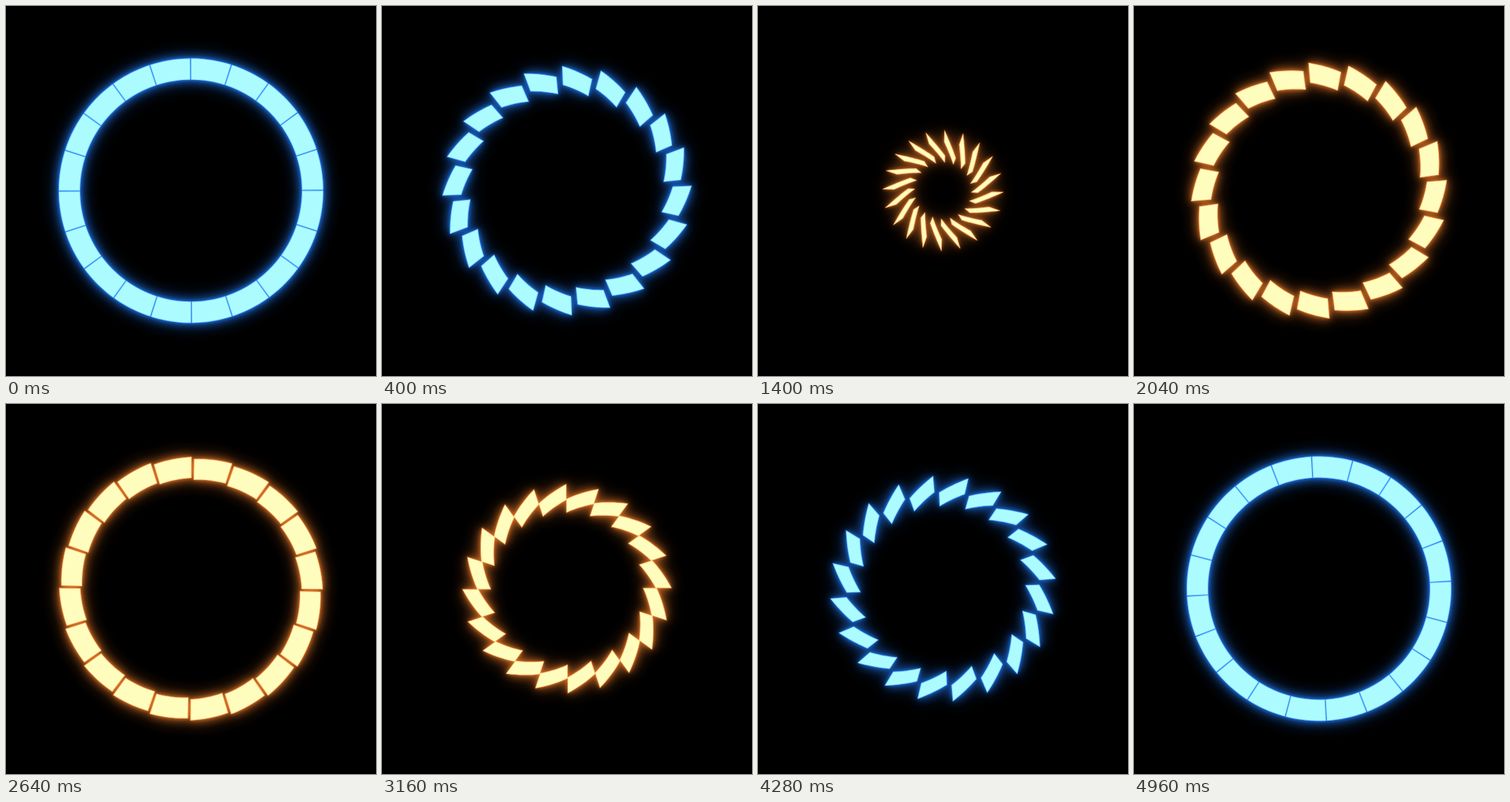
These frames come from a looping animation (540x540 px, 5 s). An HTML page with a canvas:

```html
<!DOCTYPE html>
<html>
<head>
<meta charset="utf-8">
<style>
html, body { margin: 0; width: 100%; height: 100%; overflow: hidden; background: #000; }
canvas { display: block; width: 100vw; height: 100vh; object-fit: contain; }
</style>
</head>
<body>
<canvas id="stage" width="540" height="540"></canvas>
<script>
const ctx = document.getElementById('stage').getContext('2d');
const LOOP = 5000, HALF = 2500, STEP = 40, CLOSED = 1180;
const COUNT = 20, SECTOR = 360 / COUNT, TURN = 378;
const CX = 270, CY = 269.5;

// Poses by distance in time (ms) from the most contracted moment.
const KNOTS = [0, 220, 420, 520, 600, 860, 1180];
const POSE = {
  near:  [66, 88, 133.5, 152.5, 165, 187, 193],
  far:   [28, 51, 115, 131, 140.5, 176, 193],
  half:  [7, 10, 11, 9, 7.65, 7.6, 8.83],
  shift: [5, 4.8, 1.7, 5.1, 3.05, 1.9, 0],
  depth: [.19, .19, .16, .152, .143, .155, .161]
};
const BLUE = { fill: [172, 252, 255], glow: [38, 128, 255] };
const GOLD = { fill: [255, 253, 190], glow: [238, 126, 46] };
const GLOW_LAYERS = [[26, .65], [14, .8], [5, .8]];

const clamp = (v, lo, hi) => Math.min(hi, Math.max(lo, v));
const mix = (a, b, k) => a + (b - a) * k;
const rgb = (a, b, k) => `rgb(${a.map((v, i) => Math.round(mix(v, b[i], k)))})`;

function slope(values, i) {
  if (i === 0 || i === values.length - 1) return 0;
  return (values[i + 1] - values[i - 1]) / (KNOTS[i + 1] - KNOTS[i - 1]);
}

function curve(values, x) {
  let i = 0;
  while (i < KNOTS.length - 2 && x > KNOTS[i + 1]) i++;
  const w = KNOTS[i + 1] - KNOTS[i], u = (x - KNOTS[i]) / w;
  const u2 = u * u, u3 = u2 * u;
  return values[i] * (2 * u3 - 3 * u2 + 1) + slope(values, i) * w * (u3 - 2 * u2 + u)
    + values[i + 1] * (3 * u2 - 2 * u3) + slope(values, i + 1) * w * (u3 - u2);
}

// A ring sector seen in perspective: one end near, the other far, both ends radial.
function panelPath(center, side, p) {
  const path = new Path2D(), n = 10;
  const point = (u, scale) => {
    const a = (center + side * p.half * (2 * u - 1)) * Math.PI / 180;
    const r = scale / mix(1 / p.near, 1 / p.far, u);
    path.lineTo(CX + r * Math.sin(a), CY - r * Math.cos(a));
  };
  for (let i = 0; i <= n; i++) point(i / n, 1);
  for (let i = n; i >= 0; i--) point(i / n, 1 - p.depth);
  path.closePath();
  return path;
}

function draw(time) {
  const phase = time % HALF;
  const side = time < HALF ? 1 : -1;
  const away = clamp(Math.abs(phase - CLOSED), 0, CLOSED);
  const p = {};
  for (const key in POSE) p[key] = curve(POSE[key], away);

  const turn = TURN * time / LOOP - 0.2;
  const ring = new Path2D();
  for (let i = 0; i < COUNT; i++) {
    ring.addPath(panelPath(turn + SECTOR * (i + 0.5) + side * p.shift, side, p));
  }

  const passed = clamp((phase - CLOSED + 60) / 120, 0, 1);
  const gold = side > 0 ? passed : 1 - passed;
  const glow = rgb(BLUE.glow, GOLD.glow, gold);

  ctx.fillStyle = '#000';
  ctx.fillRect(0, 0, 540, 540);
  ctx.fillStyle = ctx.shadowColor = ctx.strokeStyle = glow;
  for (const [blur, alpha] of GLOW_LAYERS) {
    ctx.shadowBlur = blur;
    ctx.globalAlpha = alpha;
    ctx.fill(ring);
  }
  ctx.shadowBlur = 0;
  ctx.globalAlpha = 1;
  ctx.fillStyle = rgb(BLUE.fill, GOLD.fill, gold);
  ctx.fill(ring);

  // Soft rim where the light falls off.
  ctx.globalAlpha = 0.25;
  ctx.lineWidth = 2;
  ctx.lineJoin = 'round';
  ctx.stroke(ring);
  ctx.globalAlpha = 1;
}

function tick() {
  const time = performance.now() % LOOP;
  draw(Math.floor(time / STEP) * STEP);
  requestAnimationFrame(tick);
}
tick();
</script>
</body>
</html>
```
